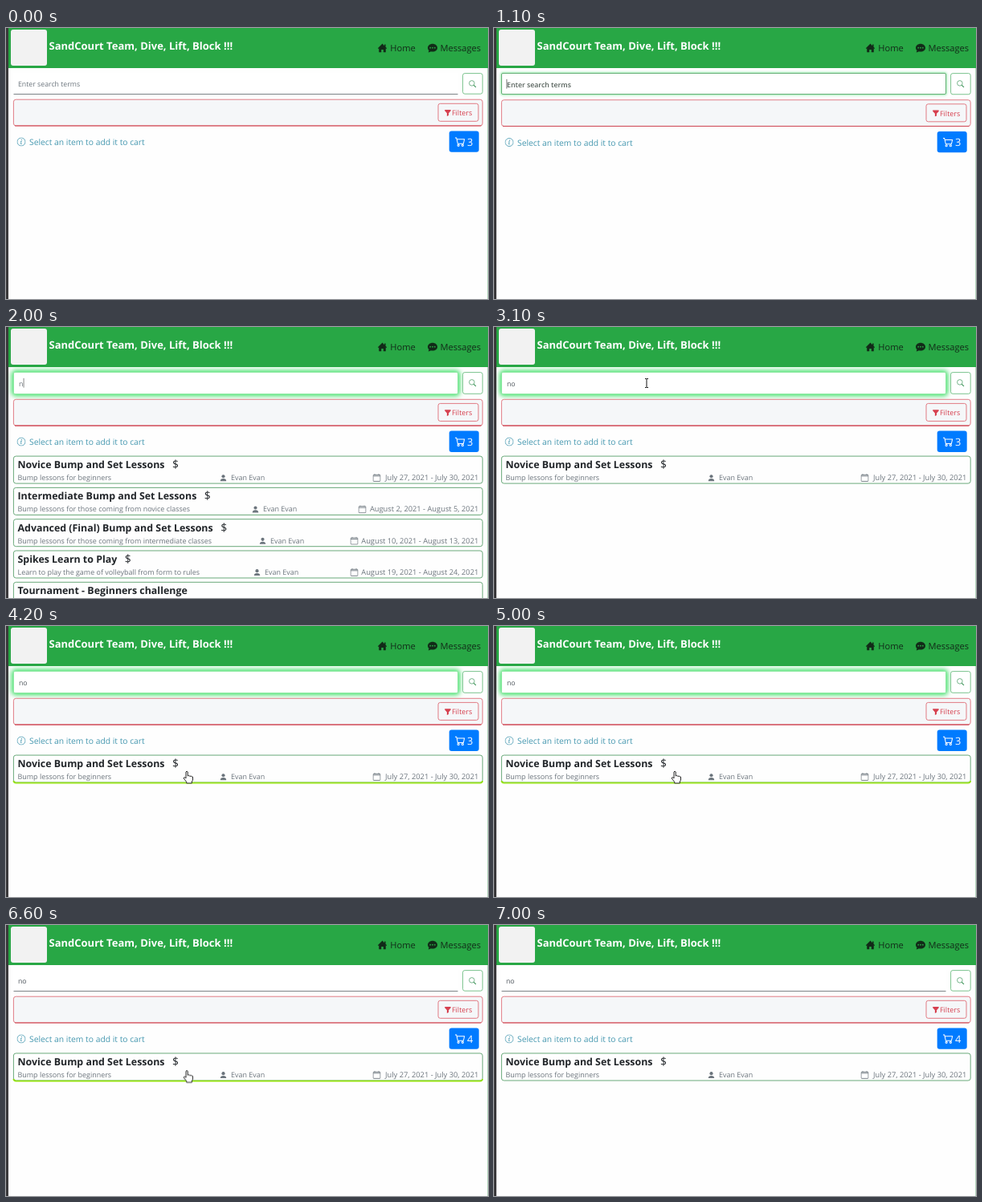
Animation of 600 by 338 pixels, one loop 8000 ms. Source, as an HTML page:

```html
<!DOCTYPE html>
<html lang="en">
<head>
<meta charset="utf-8">
<title>Lesson search</title>
<style>
html, body { margin: 0; width: 100%; height: 100%; overflow: hidden; background: #fefefe; }
body { position: relative; }
svg.page { position: absolute; left: 0; top: 0; width: 600px; height: 338px; }
svg { color: #6c757d; }
text { font-family: "Open Sans", "Noto Sans", sans-serif; text-rendering: geometricPrecision; fill: currentColor; white-space: pre; }
.small { font-size: 8.95px; }
.dates { font-size: 9.3px; }
.search { font-size: 8.75px; }
.nav { font-size: 11.1px; }
.brand { font-size: 13px; font-weight: 700; }
.title { font-size: 12.4px; font-weight: 700; fill: #212529; }
.price { font-size: 14px; font-weight: 400; }
.input {
  position: absolute; box-sizing: border-box; left: 9px; top: 56px; width: 554px; height: 27px;
  border: 1px solid transparent; border-bottom-color: #7d8387; background: #fff;
}

/* One 8 s timeline: 1% is 80 ms */
.input, .lower, .field, .grow, .step, .glow, .pointer { animation: 8s infinite; }
.step { animation-timing-function: step-end; visibility: hidden; }

.input { animation-name: focus; }
@keyframes focus {
  0%, 11.25% { border-color: transparent transparent #7d8387; border-radius: 0; height: 27px; box-shadow: 0 0 0 0 #2fd85a00; }
  12.5% { border-color: #5a9d69; border-radius: 2px; }
  20%, 62.5% { border-color: #8fe9a3; border-radius: 2px; height: 28px; box-shadow: 0 0 6px 1.5px #27dc55; }
  66.25%, 100% { border-color: transparent transparent #7d8387; border-radius: 0; height: 27px; box-shadow: 0 0 0 0 #2fd85a00; }
}
.lower { animation-name: lower; }
@keyframes lower {
  0%, 11.25%, 66.25%, 100% { transform: none; }
  20%, 62.5% { transform: translateY(1.1px); }
}
.field { animation-name: field; }
@keyframes field {
  0%, 11.25%, 66.25%, 100% { transform: none; }
  13%, 62.5% { transform: translate(1px, .6px); }
}
.grow { animation-name: grow; }
@keyframes grow {
  0%, 11.25%, 66.25%, 100% { height: 25.6px; }
  20%, 62.5% { height: 26.7px; }
}

.hint { animation-name: hint; }
@keyframes hint { 0% { visibility: visible; } 11.25%, 100% { visibility: hidden; } }
.hint-on { animation-name: hint-on; }
@keyframes hint-on { 0% { visibility: hidden; } 11.25% { visibility: visible; } 25%, 100% { visibility: hidden; } }
.caret0 { animation-name: caret0; }
@keyframes caret0 { 0% { visibility: hidden; } 11.25% { visibility: visible; } 18%, 100% { visibility: hidden; } }
.first { animation-name: first; }
@keyframes first { 0% { visibility: hidden; } 25%, 100% { visibility: visible; } }
.brief { animation-name: brief; }
@keyframes brief { 0% { visibility: hidden; } 25% { visibility: visible; } 27.5%, 100% { visibility: hidden; } }
.typed { animation-name: typed; }
@keyframes typed { 0% { visibility: hidden; } 27.5%, 100% { visibility: visible; } }
.blink { animation-name: blink; }
@keyframes blink {
  0%, 33.75%, 46.25%, 60%, 100% { visibility: hidden; }
  27.5%, 40%, 53.75% { visibility: visible; }
}
.before { animation-name: before; }
@keyframes before { 0% { visibility: visible; } 63.75%, 100% { visibility: hidden; } }
.after { animation-name: after; }
@keyframes after { 0% { visibility: hidden; } 63.75%, 100% { visibility: visible; } }

.glow { animation-name: glow; }
@keyframes glow {
  0%, 45.9% { opacity: 0; }
  50%, 83% { opacity: 1; }
  87.5%, 100% { opacity: 0; }
}
.pointer { animation-name: pointer; }
@keyframes pointer {
  0%, 38.75% { transform: translate(190px, 70px); animation-timing-function: ease-in-out; }
  48.75%, 82.4% { transform: translate(225px, 181px); animation-timing-function: ease-in; }
  86%, 100% { transform: translate(238px, 350px); }
}
.beam { animation-name: beam; }
@keyframes beam { 0% { visibility: hidden; } 38.75% { visibility: visible; } 41.75%, 100% { visibility: hidden; } }
.arrow { animation-name: arrow; }
@keyframes arrow {
  0%, 45.9%, 87%, 100% { visibility: hidden; }
  41.75%, 83.25% { visibility: visible; }
}
.hand { animation-name: hand; }
@keyframes hand { 0% { visibility: hidden; } 45.9% { visibility: visible; } 83.25%, 100% { visibility: hidden; } }
</style>
</head>
<body>
<div class="input"></div>
<svg class="page" viewBox="0 0 600 338">
  <defs>
    <symbol id="house" viewBox="0 0 16 16"><path fill="currentColor" d="M8 .8l3.4 3.4V2h2v4.2L15.6 8.4l-.9.9-1-1V15H9.7v-4.2H6.3V15h-4V8.3l-1 1-.9-.9z"/></symbol>
    <symbol id="chat" viewBox="0 0 16 16">
      <path fill="currentColor" d="M8 1c4.5 0 8 2.9 8 6.5S12.5 14 8 14c-1 0-2-.2-2.9-.5C4 14.3 2.5 15 .8 15c.8-1 1.2-2.1 1.2-3C.8 10.8 0 9.2 0 7.5 0 3.9 3.5 1 8 1z"/>
      <g fill="#28a745"><circle cx="4.3" cy="7.5" r="1.2"/><circle cx="8" cy="7.5" r="1.2"/><circle cx="11.7" cy="7.5" r="1.2"/></g>
    </symbol>
    <symbol id="lens" viewBox="0 0 16 16"><g fill="none" stroke="currentColor" stroke-width="1.3"><circle cx="6.5" cy="6.5" r="5.5"/><path d="M10.5 10.5l4.8 4.8" stroke-width="2"/></g></symbol>
    <symbol id="funnel" viewBox="0 0 16 16"><path fill="currentColor" d="M1 1h14v2.500L10 9v5l-4 2V9L1 3.500z"/></symbol>
    <symbol id="info" viewBox="0 0 16 16"><circle cx="8" cy="8" r="7.3" fill="none" stroke="currentColor" stroke-width="1.2"/><path fill="currentColor" d="M6.5 6.5h2.4L7.9 11h1.2v1H6.5l1-4.5h-1z"/><circle cx="8.7" cy="4.5" r="1" fill="currentColor"/></symbol>
    <symbol id="cart" viewBox="0 0 16 16"><g fill="none" stroke="currentColor" stroke-width="1.3"><path d="M0 2h2.2l.6 2.3 1.5 7h9l1.6-7H2.8"/><circle cx="5.3" cy="13.8" r="1.4"/><circle cx="12" cy="13.8" r="1.4"/></g></symbol>
    <symbol id="person" viewBox="0 0 16 16"><circle cx="8" cy="5" r="3.3" fill="currentColor"/><path fill="currentColor" d="M2 14.5C2 11 4.5 9.5 8 9.5s6 1.5 6 5z"/></symbol>
    <symbol id="calendar" viewBox="0 0 16 16"><g fill="none" stroke="currentColor" stroke-width="1.4"><rect x=".8" y="2" width="14.400" height="13" rx="1.5"/><path d="M1 4.500h14M4 .3v2M12 .3v2"/></g></symbol>
  </defs>

  <rect x="3" width="597" height="50" fill="#28a745"/>
  <rect width="3" height="338" fill="#3a393b"/>
  <rect x="599" y="50" width="1" height="288" fill="#b9dcc2"/>
  <rect x="6" y="2" width="45" height="45" rx="3" fill="#f2f2f2"/>
  <text class="brand" x="53.5" y="27">SandCourt Team, Dive, Lift, Block !!!</text>
  <g class="nav" color="#122a18">
    <use href="#house" x="462.5" y="19" width="12" height="12"/>
    <text x="478.3" y="29">Home</text>
    <use href="#chat" x="525" y="19" width="12" height="12"/>
    <text x="540.5" y="29">Messages</text>
  </g>

  <g class="field search">
    <text class="step hint" x="15" y="73">Enter search terms</text>
    <text class="step hint-on" x="15" y="73" font-weight="600" color="#55605a">Enter search terms</text>
    <text class="step brief" x="15" y="73">n</text>
    <text class="step typed" x="15" y="73" color="#555c63">no</text>
    <g fill="#555">
      <rect class="step caret0" x="14.5" y="63" width=".8" height="12"/>
      <rect class="step brief" x="20.7" y="63" width=".7" height="12"/>
      <rect class="step blink" x="26" y="63" width=".7" height="12"/>
    </g>
  </g>
  <g color="#4f9f68">
    <rect class="grow" x="568.6" y="56.6" width="24.6" height="25.6" rx="2.500" fill="#fff" stroke="#6dbd81" stroke-width=".9"/>
    <use href="#lens" x="576" y="65" width="9.5" height="9.5"/>
  </g>

  <g class="lower">
    <g color="#d6404f">
      <rect x="9.4" y="89.2" width="583.8" height="32.7" rx="3" fill="#f5f7f9" stroke="#de6f79" stroke-width=".9"/>
      <path d="M11 122h580.5" stroke="#cf4a57" stroke-width="1.1"/>
      <rect x="538" y="94.3" width="50" height="22" rx="2.5" fill="none" stroke="#df6c77" stroke-width=".9"/>
      <use href="#funnel" x="545.7" y="101.5" width="8.5" height="8.5"/>
      <text class="small" x="555" y="109">Filters</text>
    </g>
    <g color="#4698b0">
      <use href="#info" x="13.5" y="136.5" width="11" height="11"/>
      <text x="29" y="146" font-size="10.32">Select an item to add it to cart</text>
    </g>
    <g color="#fff" font-size="12.8">
      <rect x="551.7" y="128.500" width="37" height="26.3" rx="3" fill="#007bff"/>
      <use href="#cart" x="559" y="135.5" width="12.5" height="12.5"/>
      <text class="step before" x="574" y="146.7">3</text>
      <text class="step after" x="574" y="146.7">4</text>
    </g>
    <g id="cards"></g>
    <path class="glow" d="M9.4 192q.3 2.600 3 2.600h577.800q2.700 0 3-2.600" fill="none" stroke="#93e20c" stroke-width="1.900"/>
  </g>

  <g class="pointer" stroke-linejoin="round">
    <path class="step beam" d="M-2-5.5h1.500l.5.5.5-.5H2M0-5V5M-2 5.500h1.500L0 5l.5.500H2" fill="none" stroke="#111"/>
    <path class="step arrow" d="M0 0v12l2.8-2.600 1.900 4.300 1.800-.8-1.900-4.200h3.800z" fill="#fff" stroke="#111" stroke-width=".8"/>
    <path class="step hand" d="M-1 1Q0-.8 1.2 1v5l1.600-.5 1 .9 1.600-.3.800.9 1.300.2v4L6.300 13v2H-.3v-1.600L-3.700 9.200q-.2-1.600 1.200-1.400L-1 9z" fill="#fff" stroke="#111" stroke-width=".9"/>
  </g>
</svg>
<script>
document.querySelector(".brand").setAttribute("color", "#fff");

// title, blurb, person x, calendar x, dates
const lessons = [
  ["Novice Bump and Set Lessons", "Bump lessons for beginners", 266, 457, "July 27, 2021 - July 30, 2021"],
  ["Intermediate Bump and Set Lessons", "Bump lessons for those coming from novice classes", 306, 439, "August 2, 2021 - August 5, 2021"],
  ["Advanced (Final) Bump and Set Lessons", "Bump lessons for those coming from intermediate classes", 315, 429, "August 10, 2021 - August 13, 2021"],
  ["Spikes Learn to Play", "Learn to play the game of volleyball from form to rules", 308, 429, "August 19, 2021 - August 24, 2021"],
  ["Tournament - Beginners challenge"]
];

const icon = (id, x) => `<use href="#${id}" x="${x}" y="182" width="10" height="10"/>`;

const details = (blurb, personX, calX, dates) => `
  <text x="14.5" y="190">${blurb}</text>
  ${icon("person", personX - .5)}<text x="${personX + 14}" y="190">Evan Evan</text>
  ${icon("calendar", calX - .5)}<text class="dates" x="588.3" y="190" text-anchor="end">${dates}</text>`;

const card = ([title, ...rest], i) => `
  <g class="step small ${i ? "brief" : "first"}" transform="translate(0 ${i * 39.3})">
    <rect x="9.4" y="160" width="583.8" height="34" rx="3" fill="#fefefe" stroke="#63a573" stroke-width=".95"/>
    <text class="title" x="14.5" y="175">${title}${rest.length ? '<tspan class="price" dx="9.5">$</tspan>' : ""}</text>
    ${rest.length ? details(...rest) : ""}
  </g>`;

document.getElementById("cards").innerHTML = lessons.map(card).join("");
</script>
</body>
</html>
```
